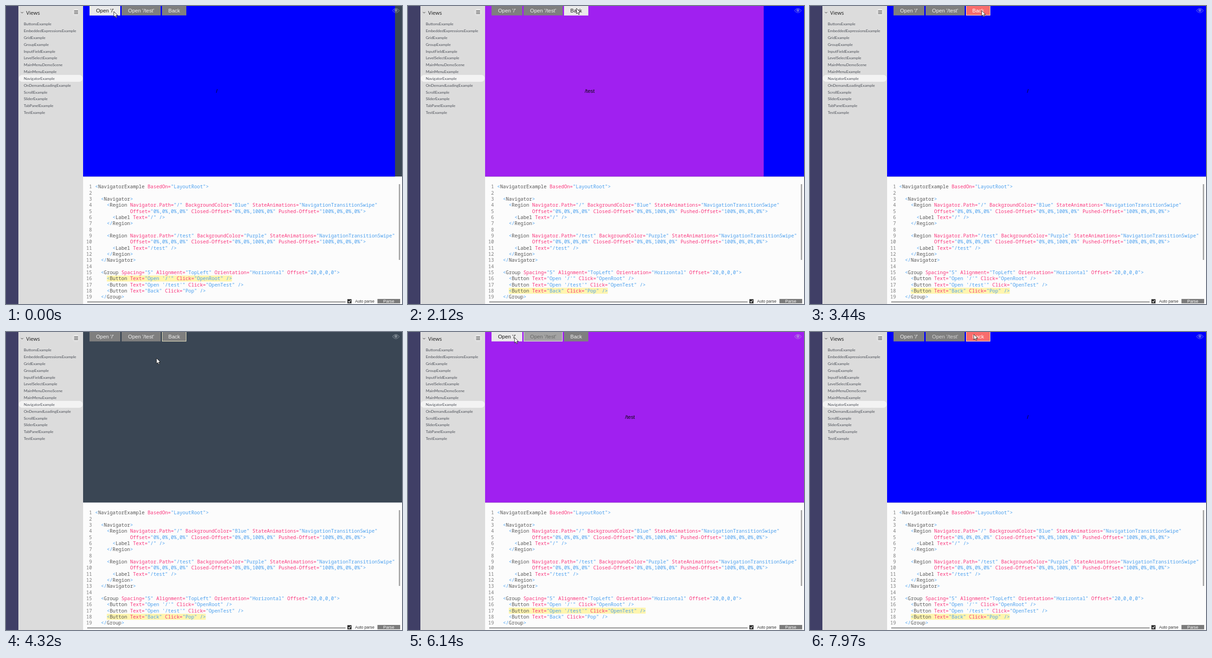
These frames come from a looping animation (863x649 px, 8 s). An HTML page with a canvas:

```html
<!DOCTYPE html>
<html lang="en">
<head>
<meta charset="utf-8">
<title>Navigator</title>
<style>
html, body { margin: 0; width: 100%; height: 100%; overflow: hidden; background: #fcfcfc; }
canvas { display: block; }
</style>
</head>
<body>
<canvas id="stage" width="863" height="649"></canvas>
<script>
const g = document.getElementById('stage').getContext('2d');
const LOOP = 8000, SLIDE = 750, PRESS = 72;
const VIEW = { x: 168, w: 695, h: 371.5 };
const SANS = '"Liberation Sans", Arial, sans-serif';
const UI = '"Open Sans", "Noto Sans", sans-serif';
const LIST = 'Lato, "Open Sans", sans-serif';
const MONO = '"Noto Sans Mono", "DejaVu Sans Mono", monospace';

const names = ['Buttons', 'EmbeddedExpressions', 'Grid', 'Group', 'InputField', 'LevelSelect',
  'MainMenuDemoScene', 'MainMenu', 'Navigator', 'OnDemandLoading', 'Scroll', 'Slider', 'TabPanel', 'Test'];

const code = `<NavigatorExample BasedOn="LayoutRoot">

  <Navigator>
    <Region Navigator.Path="/" BackgroundColor="Blue" StateAnimations="NavigationTransitionSwipe"
            Offset="0%,0%,0%,0%" Closed-Offset="0%,0%,100%,0%" Pushed-Offset="100%,0%,0%,0%">
      <Label Text="/" />
    </Region>

    <Region Navigator.Path="/test" BackgroundColor="Purple" StateAnimations="NavigationTransitionSwipe"
            Offset="0%,0%,0%,0%" Closed-Offset="0%,0%,100%,0%" Pushed-Offset="100%,0%,0%,0%">
      <Label Text="/test" />
    </Region>
  </Navigator>

  <Group Spacing="5" Alignment="TopLeft" Orientation="Horizontal" Offset="20,0,0,0">
    <Button Text="Open '/'" Click="OpenRoot" />
    <Button Text="Open '/test'" Click="OpenTest" />
    <Button Text="Back" Click="Pop" />
  </Group>`.split('\n');

const pages = [{ label: '/', fill: '#0000ff' }, { label: '/test', fill: '#a020f0' }];
const [ROOT, TEST, BACK] = [0, 1, 2];

// Each click: release time and button
const clicks = [[-638, ROOT], [683, TEST], [2072, BACK], [3512, BACK],
  [4970, TEST], [6285, ROOT], [8030, BACK]].map(([up, button]) => ({ up, button }));

// Pointer moves: start, end, x, y
const moves = [[380, 580, 263, 9], [1440, 1960, 367, 5], [2700, 2890, 374, 10], [3540, 3950, 328, 57],
  [4440, 4820, 285, 11], [5900, 6150, 232, 12], [7390, 7860, 357, 5]];

const mix = (a, b, k) => a + (b - a) * k;
const clamp = v => Math.min(1, Math.max(0, v));
const gray = v => `rgb(${Array(3).fill(Math.round(v))})`;

function rect(x, y, w, h, fill) {
  g.fillStyle = fill;
  g.fillRect(x, y, w, h);
}

function text(s, x, y, size, family, fill, align = 'left') {
  g.font = `${size}px ${family}`;
  g.textAlign = align;
  g.fillStyle = fill;
  g.fillText(s, x, y);
}

function line(points, color, width) {
  g.beginPath();
  points.forEach(([x, y]) => g.lineTo(x, y));
  g.strokeStyle = color;
  g.lineWidth = width;
  g.stroke();
}

function layoutButtons() {
  g.font = `11.4px ${SANS}`;
  let x = 182;
  return ["Open '/'", "Open '/test'", 'Back'].map(label => {
    const w = g.measureText(label).width + 28;
    const b = { label, x: Math.round(x), w: Math.round(w) };
    x += w + 3.5;
    return b;
  });
}
const buttons = layoutButtons();

// Replays the clicks on a page stack; offsets are in view widths
function pageOffsets(t) {
  const slides = pages.map(() => ({ start: 0, from: -1, to: -1 }));
  const stack = [];
  for (const { up, button } of clicks) {
    if (up > t) break;
    const slide = (page, from, to) => {
      if (page !== undefined) slides[page] = { start: up, from, to };
    };
    if (button === BACK) {
      slide(stack.pop(), 0, -1);
      slide(stack.at(-1), 1, 0);
    } else {
      slide(stack.at(-1), 0, 1);
      slide(button, -1, 0);
      stack.push(button);
    }
  }
  return slides.map(s => mix(s.to, s.from, (1 - clamp((t - s.start) / SLIDE)) ** 2));
}

function pointer(t) {
  let x = 235, y = 12;
  for (const [start, end, tx, ty] of moves) {
    const u = clamp((t - start) / (end - start));
    const k = u * u * (3 - 2 * u);
    x = mix(x, tx, k);
    y = mix(y, ty, k);
  }
  return [x, y];
}

function isOver(b, t) {
  const [x, y] = pointer(t);
  return x >= b.x && x <= b.x + b.w && y <= 20;
}

// 1 while the pointer is over the button, then fading out
function hover(b, t, fade) {
  for (let age = 0; age < fade; age += 5) {
    if (isOver(b, t - age)) return 1 - age / fade;
  }
  return 0;
}

function drawSidebar() {
  rect(0, 0, 27, 649, '#403f66');
  rect(27, 0, 141, 649, '#dcdcdc');
  line([[32.5, 13], [35, 15.5], [37.5, 13]], '#333', 1);
  text('Views', 44, 18.5, 11.3, UI, '#1c1c1c');
  g.beginPath();
  g.arc(152.5, 13.3, 8, 0, 7);
  g.fillStyle = '#e3e3e3';
  g.fill();
  for (let i = 0; i < 3; i++) rect(148.5, 10 + i * 3, 8.5, 1, '#333');
  g.beginPath();
  g.roundRect(28, 150, 139, 15, 7);
  g.fillStyle = '#f3f3f3';
  g.fill();
  names.forEach((name, i) => {
    const full = name.endsWith('Scene') ? name : name + 'Example';
    text(full, 38.7, 42.2 + i * 14.84, 8.45, LIST, '#4b4f57');
  });
}

function drawPage(page, offset) {
  const x = VIEW.x + offset * VIEW.w;
  rect(x, 0, VIEW.w, VIEW.h, page.fill);
  text(page.label, x + 305, 189.3, 11.4, SANS, '#080808');
}

function drawButton(b, t, down, focused) {
  const bg = hover(b, t, 150), ink = hover(b, t, 270);
  rect(b.x, 0, b.w, 20.5, down ? '#f86c6c' : gray(mix(127, 234, bg)));
  if (focused) {
    g.strokeStyle = down ? '#ffe9c0' : bg > 0 ? '#e6e6e2' : '#f4efca';
    g.lineWidth = 1;
    g.strokeRect(b.x + 0.5, -0.5, b.w - 1, 20.5);
  }
  text(b.label, b.x + b.w / 2, 14, 11.4, SANS, down ? '#fff' : gray(mix(240, 24, ink)), 'center');
}

function drawEye() {
  g.strokeStyle = g.fillStyle = 'rgba(200,206,212,.45)';
  g.lineWidth = 1.2;
  g.beginPath();
  g.moveTo(842.5, 10);
  g.quadraticCurveTo(849.7, 0.5, 857, 10);
  g.quadraticCurveTo(849.7, 19.5, 842.5, 10);
  g.stroke();
  g.beginPath();
  g.arc(849.7, 9.5, 3.2, 0, 7);
  g.fill();
}

function drawView(t, click) {
  g.save();
  g.beginPath();
  g.rect(VIEW.x, 0, VIEW.w, VIEW.h);
  g.clip();
  rect(VIEW.x, 0, VIEW.w, VIEW.h, '#3a4654');
  pageOffsets(t).forEach((offset, i) => drawPage(pages[i], offset));
  buttons.forEach((b, i) => {
    const focused = click.button === i;
    drawButton(b, t, focused && t < click.up, focused);
  });
  drawEye();
  g.restore();
}

function drawCode(active) {
  const left = 194.3, adv = 6.345, pitch = 13.335, size = adv / 0.6;
  rect(168, VIEW.h, 695, 649 - VIEW.h, '#fcfcfc');
  code.forEach((row, i) => {
    const y = 397.3 + i * pitch;
    if (i === active) {
      const col = row.search(/\S/);
      rect(left + col * adv, y - 10.3, (row.length - col) * adv, 13, '#fff5ae');
    }
    text(i + 1, 187.3, y, size, MONO, '#7d7d7d', 'right');
    for (const m of row.matchAll(/("[^"]*"|<\/?|\/?>)|([\w.-]+=)|\w+/g)) {
      const fill = m[1] ? '#4a9fee' : m[2] ? '#f9357c' : '#555';
      text(m[0], left + m.index * adv, y, size, MONO, fill);
    }
  });
  rect(856, 388, 3, 165, '#a9a9a9');
  rect(177, 643, 563, 3, '#a9a9a9');
  rect(744, 638.5, 9, 9, '#2b2b2b');
  line([[746, 643], [748, 645], [751.3, 640.7]], '#fff', 1.2);
  text('Auto parse', 760.7, 646, 8.7, SANS, '#333');
  rect(809.5, 638, 49.5, 9.5, '#7c7c7c');
  text('Parse', 834, 646.2, 9.2, SANS, '#fff', 'center');
}

function drawPointer(t) {
  const [x, y] = pointer(t);
  const shape = [[0, 0], [0, 12], [2.8, 9.4], [4.7, 13.6], [6.6, 12.8], [4.8, 8.7], [8.5, 8.5]];
  g.beginPath();
  shape.forEach(([dx, dy]) => g.lineTo(x + dx, y + dy));
  g.closePath();
  g.fillStyle = '#fff';
  g.fill();
  g.strokeStyle = '#111';
  g.lineWidth = 0.9;
  g.stroke();
}

function draw(t) {
  const click = clicks.findLast(c => c.up - PRESS <= t);
  drawSidebar();
  drawCode(15 + click.button);
  drawView(t, click);
  drawPointer(t);
}

const began = performance.now();
function tick() {
  draw((performance.now() - began) % LOOP);
  requestAnimationFrame(tick);
}
tick();
</script>
</body>
</html>
```
